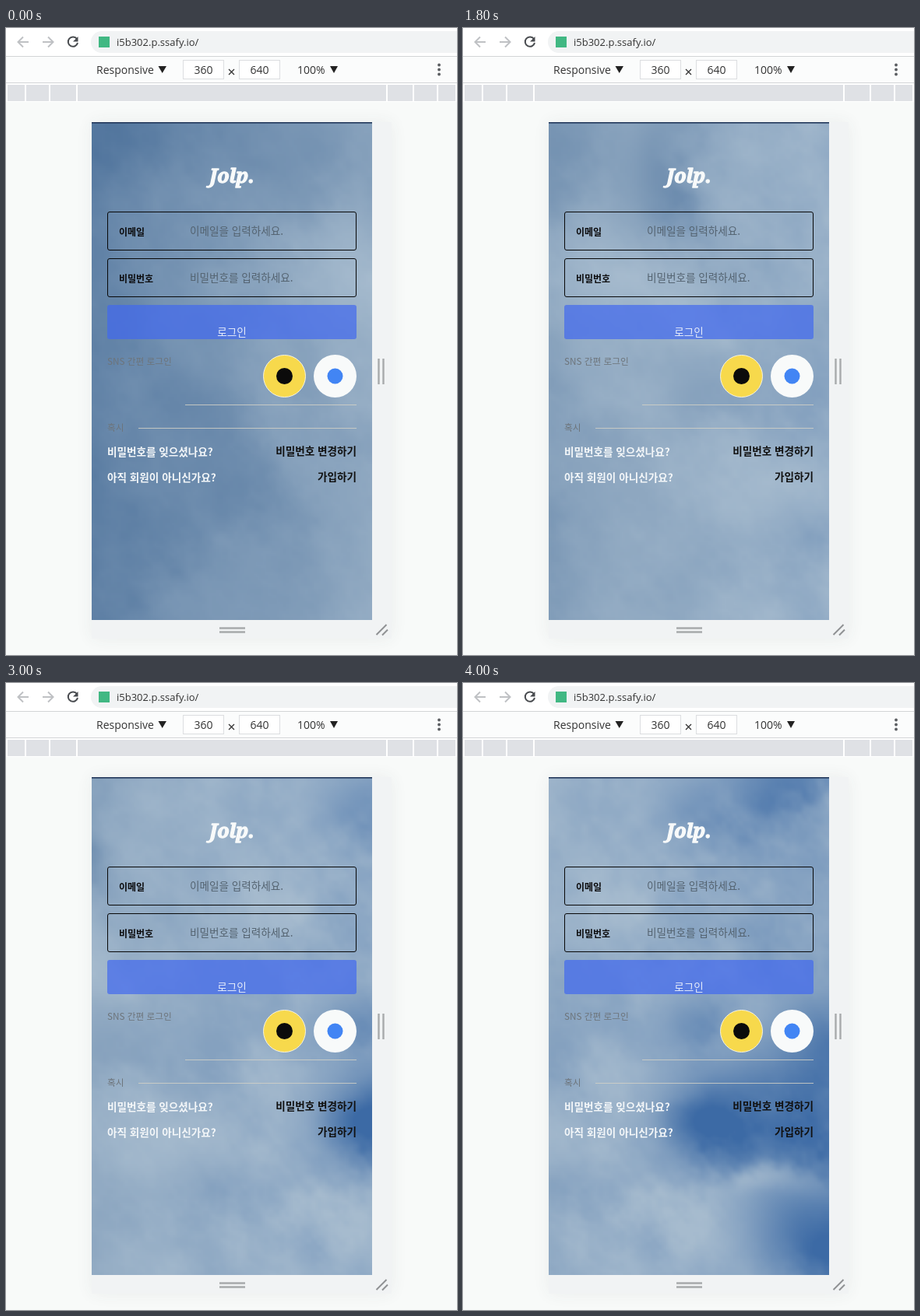
Write an HTML page with a canvas that moves like this. It is 579x806 px and loops after 4100 ms.

```html
<!DOCTYPE html>
<html lang="ko">
<head>
<meta charset="utf-8">
<title>Login</title>
<style>
  html, body { margin: 0; width: 100%; height: 100%; overflow: hidden; background: #f8faf9; }
  #stage { position: relative; width: 579px; height: 806px; overflow: hidden; }
  #sky { position: absolute; left: 110px; top: 121px; width: 360px; height: 640px; }
  svg { position: absolute; left: 0; top: 0; }
  #frame { position: absolute; left: 110px; top: 121px; width: 385px; height: 664px;
    background: #f1f3f4; box-shadow: 0 0 20px rgba(60, 64, 67, .07); }
  .ui { font: 14px "Open Sans", "Noto Sans", sans-serif; fill: #333; }
  .ko { font: 13.6px "Noto Sans CJK KR", "Noto Sans CJK", sans-serif; }
  .label { font-size: 12px; font-weight: 700; fill: #0c0c0e; }
  .hint { fill: #53626f; }
  .small { font-size: 11.7px; fill: #6d747a; }
  .ask { font-weight: 700; fill: #f4f7f9; }
  .link { font-weight: 700; fill: #111; text-anchor: end; }
  .brand { font: italic 700 25px "Noto Serif", serif; fill: #f8fafa; stroke: #f8fafa;
    stroke-width: 1.3; stroke-linejoin: round; text-anchor: middle; }
  .field { fill: none; stroke: #080808; }
  .line { fill: none; stroke-width: 2; }
</style>
</head>
<body>
<div id="stage">
  <div id="frame"></div>
  <canvas id="sky" width="120" height="213"></canvas>
  <svg width="579" height="806" viewBox="0 0 579 806">
    <!-- browser bar -->
    <rect width="579" height="36" fill="#fff"/>
    <rect x="109" y="4" width="500" height="28" rx="14" fill="#f1f3f4"/>
    <g class="line">
      <path d="M29 18H16M22 11.5L15.5 18L22 24.5M47 18H60M54 11.5L60.5 18L54 24.5" stroke="#bfc1c4"/>
      <path d="M91 14A6.2 6.2 0 1 0 92 19" stroke="#484b4f"/>
    </g>
    <path d="M92.5 11V17.5H86Z" fill="#484b4f"/>
    <rect x="119" y="11" width="14" height="14" fill="#41b883"/>
    <text class="ui" x="142" y="23" style="font-size:13px">i5b302.p.ssafy.io/</text>

    <!-- device bar -->
    <rect y="36" width="579" height="1" fill="#d2d4d6"/>
    <rect y="37" width="579" height="33" fill="#fbfcfc"/>
    <rect y="70" width="579" height="1" fill="#d2d4d6"/>
    <g fill="#fff" stroke="#dcdee0">
      <rect x="227.5" y="41.5" width="52" height="24"/>
      <rect x="299.5" y="41.5" width="52" height="24"/>
    </g>
    <g class="ui">
      <text x="116" y="59">Responsive</text>
      <text x="253.5" y="59" text-anchor="middle">360</text>
      <text x="325.5" y="59" text-anchor="middle">640</text>
      <text x="374" y="59">100%</text>
    </g>
    <path d="M286 53L293 60M293 53L286 60" stroke="#333" stroke-width="1.3"/>
    <path d="M195.5 49H206L200.7 58ZM416 49H426L421 58Z" fill="#222"/>
    <g fill="#5a5d61">
      <circle cx="556" cy="47.5" r="1.9"/><circle cx="556" cy="53.5" r="1.9"/><circle cx="556" cy="59.5" r="1.9"/>
    </g>
    <rect y="71" width="579" height="24" fill="#fff"/>
    <path d="M2 73h22v21h-22zM26 73h29v21h-29zM57 73h33v21h-33zM92 73h396v21h-396zM490 73h32v21h-32zM524 73h29v21h-29zM555 73h22v21h-22z" fill="#dfe1e5"/>

    <!-- resize handles -->
    <path d="M478.5 425V458M484.5 425V458M274 771.5H307M274 776.5H307" stroke="#a8aaac" stroke-width="2.4"/>
    <path d="M475.5 780L488.5 767M483 780.5L490 773.5" stroke="#8f9193" stroke-width="2"/>

    <!-- login page -->
    <rect x="110" y="121" width="360" height="1.6" fill="#22375a"/>
    <text class="brand" x="290" y="199">Jolp.</text>
    <rect class="field" x="130.5" y="236.5" width="319" height="49" rx="2.5"/>
    <rect class="field" x="130.5" y="296.5" width="319" height="49" rx="2.5"/>
    <text class="ko label" x="145" y="267">이메일</text>
    <text class="ko label" x="145" y="327">비밀번호</text>
    <text class="ko hint" x="236" y="266">이메일을 입력하세요.</text>
    <text class="ko hint" x="236" y="326">비밀번호를 입력하세요.</text>
    <rect x="130" y="356" width="320" height="44" rx="3" fill="rgba(65,105,240,.7)"/>
    <text class="ko" x="290" y="396" text-anchor="middle" fill="#e6ecfa">로그인</text>
    <text class="ko small" x="130" y="433">SNS 간편 로그인</text>
    <circle cx="357.5" cy="447.5" r="27" fill="#f7d94c" stroke="#f6f3df"/>
    <circle cx="357.5" cy="447.5" r="10.5" fill="#0b0b0b"/>
    <circle cx="422.5" cy="447.5" r="27.5" fill="#f8fafa"/>
    <circle cx="422.5" cy="447.5" r="10" fill="#4285f4"/>
    <path d="M230 484.5H450M170 514.5H450" stroke="#d2d0c6" stroke-opacity=".85"/>
    <text class="ko small" x="130" y="518">혹시</text>
    <text class="ko ask" x="130" y="550">비밀번호를 잊으셨나요?</text>
    <text class="ko ask" x="130" y="583">아직 회원이 아니신가요?</text>
    <text class="ko link" x="450" y="549">비밀번호 변경하기</text>
    <text class="ko link" x="450" y="582">가입하기</text>
  </svg>
</div>
<script>
const STEP = 100, STEPS = 41, SPEED = 0.15, SCALE = 3;
const canvas = document.getElementById('sky');
const ctx = canvas.getContext('2d');
const { width: W, height: H } = canvas;
const image = ctx.createImageData(W, H);

// Thick (+) and thin (-) cloud areas: x, y, radius x, radius y, weight
const areas = [
  [280, 230, 100, 80, .1], [110, 590, 70, 50, .15], [30, 20, 160, 60, -.14],
  [185, 400, 60, 110, -.14], [290, 40, 50, 60, -.16], [405, 60, 40, 80, -.32],
  [610, 350, 45, 35, -.14], [460, 360, 35, 40, -.16], [610, 530, 60, 35, -.12],
  [800, 50, 55, 40, -.3], [905, 5, 60, 35, -.4], [800, 450, 45, 45, -.6],
  [895, 445, 90, 75, -.75], [785, 320, 35, 35, -.3], [955, 330, 45, 45, -.35],
  [950, 600, 70, 60, -.65], [890, 525, 60, 18, .35], [790, 580, 60, 50, .2]
];

const clamp = v => Math.max(0, Math.min(1, v));
const mix = (a, b, k) => a + (b - a) * k;
const ease = v => v * v * (3 - 2 * v);
const ramp = (v, a, b) => ease(clamp((v - a) / (b - a)));

function hash(x, y) {
  let h = Math.imul(x, 374761393) + Math.imul(y, 668265263);
  h = Math.imul(h ^ (h >>> 13), 1274126177);
  return ((h ^ (h >>> 16)) >>> 0) / 4294967296;
}

function noise(x, y) {
  const i = Math.floor(x), j = Math.floor(y);
  const u = ease(x - i), v = ease(y - j);
  return mix(mix(hash(i, j), hash(i + 1, j), u),
             mix(hash(i, j + 1), hash(i + 1, j + 1), u), v) - .5;
}

function texture(x, y, t) {
  let sum = 0, gain = .45, size = 110;
  for (let o = 0; o < 5; o++) {
    sum += gain * noise(x / size + o * 17, (y - x * .25) / size + o * 9 + t * .00008 * o);
    gain *= .6;
    size *= .5;
  }
  return sum;
}

function cover(x, y, t) {
  const n = texture(x, y, t);
  let v = .24 + .0016 * Math.min(x, 380) - .12 * ramp(x, 700, 930);
  v += n * mix(.4, .7, ramp(x, 380, 850));
  const wx = x + n * 80, wy = y + n * 60;
  for (const [ax, ay, rx, ry, k] of areas) {
    const d = ((wx - ax) / rx) ** 2 + ((wy - ay) / ry) ** 2;
    if (d < 6) v += k * Math.exp(-d * .8);
  }
  return clamp(v);
}

function draw(t) {
  const px = image.data;
  for (let j = 0, p = 0; j < H; j++) {
    for (let i = 0; i < W; i++, p += 4) {
      const x = (i + .5) * SCALE + t * SPEED, y = (j + .5) * SCALE;
      const v = cover(x, y, t), late = ramp(x, 350, 800);
      px[p] = mix(mix(74, 60, late), 166, v);
      px[p + 1] = mix(mix(111, 106, late), 187, v);
      px[p + 2] = mix(mix(153, 165, late), 206, v);
      px[p + 3] = 255;
    }
  }
  ctx.putImageData(image, 0, 0);
}

let shown = -1;
const start = performance.now();
function tick() {
  const step = Math.floor((performance.now() - start) / STEP) % STEPS;
  if (step !== shown) draw((shown = step) * STEP);
  requestAnimationFrame(tick);
}
tick();
</script>
</body>
</html>
```
